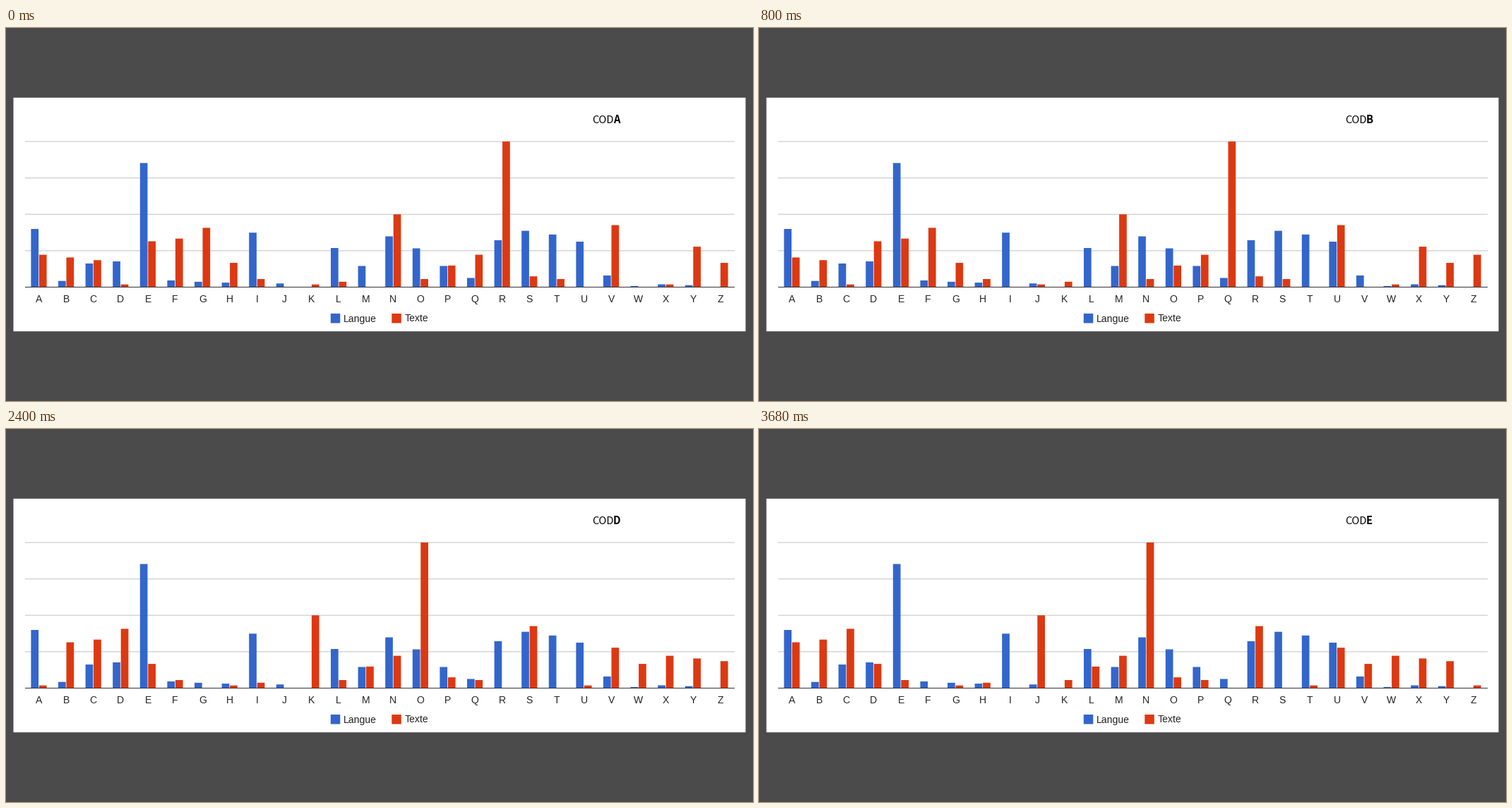
Write a matplotlib script that moves like this. It is 1058 by 529 pixels and loops after 4 s.

```python
import numpy as np
import matplotlib.pyplot as plt
from matplotlib.animation import FuncAnimation
from matplotlib.patches import Rectangle

WIDTH, HEIGHT, DPI = 1058, 529, 100
BLUE, RED, INK = "#3366cc", "#dc3912", "#222222"
LETTERS = "ABCDEFGHIJKLMNOPQRSTUVWXYZ"
TOP, BASE = 161, 367.5
PITCH, BAR_WIDTH = 38.6, 10.7


def frequencies(*ramps):
    """Values for A to Z; each ramp falls evenly along its ranked letters."""
    values = np.zeros(len(LETTERS))
    for letters, first, last in ramps:
        ranked = [LETTERS.index(c) for c in letters]
        values[ranked] = np.linspace(first, last, len(letters))
    return values


# Both histograms fill the chart height at their respective maximum
language = 10 * frequencies(
    ("E", 17.6, 17.6), ("ASITN", 8.25, 7.2), ("RU", 6.65, 6.45),
    ("LO", 5.55, 5.5), ("DC", 3.65, 3.35), ("MP", 3, 3),
    ("VQF", 1.65, 0.95), ("BGHJXYWZ", 0.88, 0.04))
counts = np.floor(0.5 + frequencies(
    ("R", 54, 54), ("N", 27, 27), ("VG", 23, 22), ("FEY", 18, 15),
    ("AQBCHZP", 12.4, 8), ("SIOTL", 3.9, 2.1), ("DKX", 1, 1)))
cipher = counts * (BASE - TOP) / counts.max()

fig = plt.figure(figsize=(WIDTH / DPI, HEIGHT / DPI), dpi=DPI,
                 facecolor="#4b4b4b")
ax = fig.add_axes([0, 0, 1, 1])
ax.set(xlim=(0, WIDTH), ylim=(HEIGHT, 0))
ax.axis("off")


def box(x, y, w, h, color, z=1):
    patch = Rectangle((x, y), w, h, facecolor=color, linewidth=0,
                      zorder=z, snap=False)
    return ax.add_patch(patch)


def label(x, y, text, px=14, font="Liberation Sans", color=INK, **style):
    return ax.text(x, y, text, fontsize=px * 72 / DPI, family=font,
                   color=color, va="baseline", zorder=5, **style)


def bar_set(left, heights, color):
    return [box(left + PITCH * i, BASE - h, BAR_WIDTH, h, color, 3)
            for i, h in enumerate(heights)]


box(10.5, 98.8, 1037, 331.4, "white", 0)
for y in np.linspace(TOP, BASE, 5)[:-1]:
    box(27, y - 0.6, 1005, 1.2, "#cccccc")
box(27, 367, 1005, 1, "#333333", 4)

bar_set(35.4, language, BLUE)
cipher_bars = bar_set(46.9, cipher, RED)

for i, letter in enumerate(LETTERS):
    label(46.6 + PITCH * i, 389, letter, ha="center")
for x, name, color in ((459.8, "Langue", BLUE), (546.3, "Texte", RED)):
    box(x, 405, 13.5, 13.5, color)
    label(x + 18.2, 416.5, name)

TITLE = dict(px=14.8, font="Noto Sans CJK JP", color="black")
label(830.3, 135, "COD", ha="left", **TITLE)
key_letter = label(864.6, 135, "A", ha="center", weight="bold", **TITLE)


def update(step):
    """Rotate the text histogram left by one letter per step."""
    for bar, h in zip(cipher_bars, np.roll(cipher, -step)):
        bar.set_y(BASE - h)
        bar.set_height(h)
    key_letter.set_text(LETTERS[step])
    return [*cipher_bars, key_letter]


anim = FuncAnimation(fig, update, frames=5, interval=800, repeat=True)
plt.show()
```
